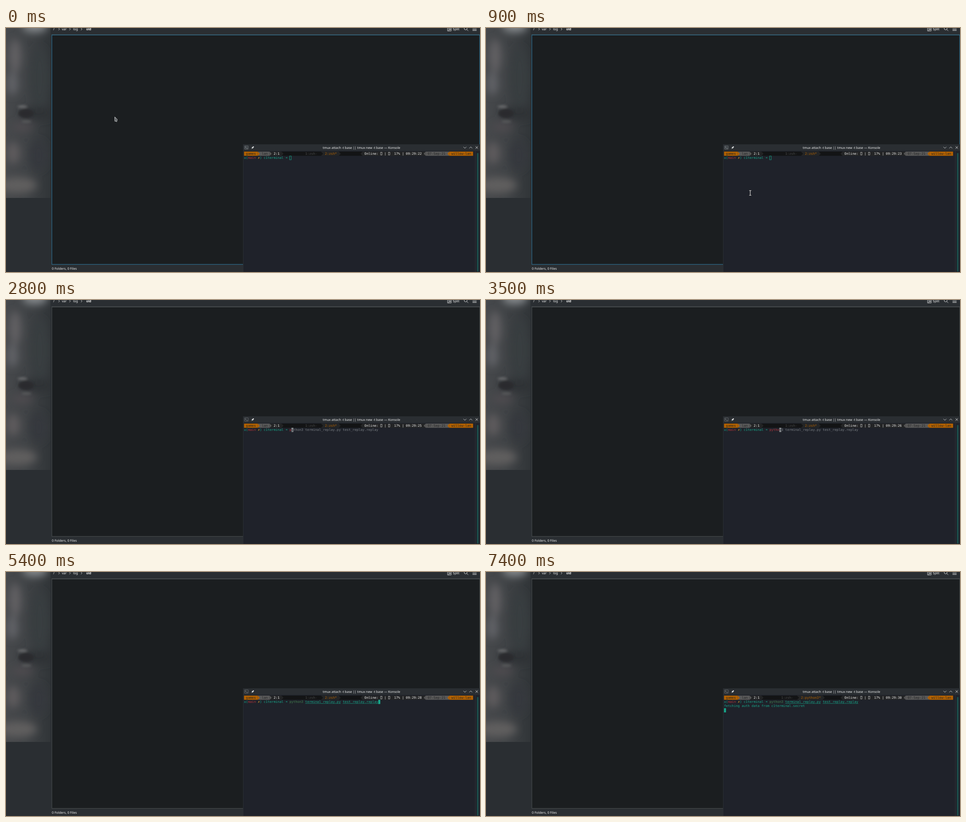
An HTML page that plays this animation: 1044x537 px, repeating every 8000 ms.

```html
<!DOCTYPE html>
<html lang="en">
<head>
<meta charset="utf-8">
<title>Terminal session</title>
<style>
html, body { margin: 0; width: 100%; height: 100%; overflow: hidden; background: #2a2e32; }
svg { display: block; }
text { white-space: pre; text-rendering: geometricPrecision; }
.ui { font: 7.1px "Noto Sans", sans-serif; fill: #f2f3f3; }
.mono { font: 7.226px "DejaVu Sans Mono", monospace; }
.line { fill: none; stroke: #f2f3f3; stroke-width: .8; }
</style>
</head>
<body>
<svg width="1044" height="537" viewBox="0 0 1044 537">
  <defs>
    <clipPath id="wall"><rect width="98" height="374"/></clipPath>
    <filter id="soft" x="-100%" y="-100%" width="300%" height="300%"><feGaussianBlur stdDeviation="9"/></filter>
    <filter id="crisp" x="-100%" y="-100%" width="300%" height="300%"><feGaussianBlur stdDeviation="2.5"/></filter>
    <linearGradient id="shade">
      <stop stop-color="#46484b"/><stop offset=".45" stop-color="#404346"/><stop offset="1" stop-color="#313538"/>
    </linearGradient>
  </defs>

  <!-- wallpaper -->
  <rect width="1044" height="537" fill="#2a2e32"/>
  <g clip-path="url(#wall)">
    <rect width="98" height="374" fill="url(#shade)"/>
    <g filter="url(#soft)">
      <ellipse cx="64" cy="-4" rx="28" ry="14" fill="#85898c"/>
      <ellipse cx="20" cy="62" rx="13" ry="38" fill="#626163"/>
      <ellipse cx="14" cy="122" rx="13" ry="26" fill="#606266"/>
      <ellipse cx="74" cy="110" rx="20" ry="70" fill="#393d40"/>
      <ellipse cx="70" cy="188" rx="38" ry="14" fill="#2e3134"/>
      <ellipse cx="36" cy="218" rx="24" ry="9" fill="#504c4f"/>
      <ellipse cx="16" cy="275" rx="14" ry="24" fill="#5f5c5d"/>
      <ellipse cx="72" cy="280" rx="20" ry="34" fill="#36393c"/>
      <ellipse cx="26" cy="346" rx="42" ry="17" fill="#615e5e"/>
    </g>
    <g filter="url(#crisp)">
      <ellipse cx="36" cy="173" rx="11" ry="3" fill="#68696b"/>
      <ellipse cx="45" cy="206" rx="11" ry="2.5" fill="#595a5c"/>
      <ellipse cx="44" cy="188" rx="17" ry="10" fill="#292b2d"/>
    </g>
  </g>

  <!-- file manager -->
  <rect x="98" width="946" height="537" fill="#2a2e32"/>
  <path d="M100 14.3H1044" stroke="#4b4f52" stroke-width=".7"/>
  <rect id="view" x="101" y="15.4" width="942.3" height="504.8" fill="#1b1e20"/>
  <g class="ui">
    <text x="104" y="5">/</text>
    <text x="123" y="5">var</text>
    <text x="148" y="5">log</text>
    <text x="176.8" y="5" font-weight="700">old</text>
    <text x="984" y="5">Split</text>
    <text x="101" y="532.3">0 Folders, 0 Files</text>
  </g>
  <path class="line" d="M115.5 0l2.5 2.5-2.5 2.5M139.5 0l2.5 2.5-2.5 2.5M165 0l2.5 2.5-2.5 2.5
    M972.5-2V6.5H980.5V-2M975.5-2V6.5M978 .8V4.8M976.4 2.8H979.8M1014.8 3.2L1018 6.4"/>
  <circle class="line" cx="1012.4" cy="1" r="3.2"/>
  <path class="line" d="M1027.5-.5h9M1027.5 2.5h9M1027.5 5.5h9" style="stroke-width:1.2"/>

  <!-- terminal window -->
  <rect x="522" y="256" width="522" height="281" fill="#2a2e32"/>
  <rect x="523" y="270.5" width="521" height="267" fill="#1f222a"/>
  <path d="M1033.6 271V537" stroke="#34383d" stroke-width=".8"/>
  <rect x="1037.2" y="275" width="3.6" height="261" rx="1.6" fill="#1b4f4c"/>
  <rect id="icon" x="525.5" y="259.3" width="8" height="7.6" rx=".8" stroke="#74797d" stroke-width=".7"/>
  <path d="M527 261l1.8 1.5-1.8 1.5M529.5 264.8h2.5" fill="none" stroke="#b4b8ba" stroke-width=".7"/>
  <path d="M540.3 266l2-2-1.2-1.2 2.2-.6 1.3-2 1.7 1.7-2 1.3-.6 2.2-1.1-1.1z" fill="#f2f3f3" stroke="#f2f3f3" stroke-width=".3"/>
  <text class="ui" x="783" y="265.7" text-anchor="middle">tmux attach -t base || tmux new -t base — Konsole</text>
  <path class="line" d="M1007.5 261.6l3.2 3.2 3.2-3.2M1020.5 264.8l3.2-3.2 3.2 3.2M1034.2 260.5l5.2 5.2M1039.4 260.5l-5.2 5.2"/>
  <g id="screen" class="mono"></g>

  <!-- pointers -->
  <path id="arrow" d="M.6 .8L6 6.2 4.7 11.4 3.2 10 .9 10.2z" fill="#55595c" stroke="#e4e5e5" stroke-width=".9" stroke-linejoin="round"/>
  <g id="beam" fill="none">
    <path d="M-2.6-5.4H2.6M0-5.4V5.4M-2.6 5.4H2.6" stroke="#15171a" stroke-width="2.4"/>
    <path d="M-2.4-5.2H2.4M0-5.2V5.2M-2.4 5.2H2.4" stroke="#f0f0f0" stroke-width="1.1"/>
  </g>
</svg>
<script>
const $ = id => document.getElementById(id);
const CELL = 4.35, ROW = 9.25, LEFT = 524.2, TOP = 272;
const ORANGE = '#b06000', GREY = '#585858', DARK = '#242526', BLACK = '#131415',
      TEAL = '#17a88b', RED = '#b3343d', GREEN = '#43804f', DIM = '#7b8085', WHITE = '#eeeeee';
const LOOP = 8000;
const COMMAND = 'python3', ARGS = ['terminal_replay.py', 'test_replay.replay'];
const LINE = [COMMAND, ...ARGS].join(' ');
const PROMPT = 23;

// [time, value] steps
const TICKS = [500, 1500, 2500, 3500, 4500, 5400, 6500, 7400];
const TYPED = [[0, 0], [2800, 1], [3100, 3], [3300, 4], [3500, 5], [3700, 6], [3800, 7], [4900, LINE.length]];
const POINTER = [[0, 239, 195], [200, 270, 213], [300, 388, 279], [400, 487, 332], [500, 524, 351],
                 [800, 533, 355], [900, 582, 363], [1000, 640, 368], [1100, 661, 369]];
const at = (steps, t) => steps.filter(s => s[0] <= t).pop();

const X = col => LEFT + col * CELL;
const Y = row => TOP + row * ROW;
const put = (col, row, text, fill, extra = '') =>
  `<text x="${X(col)}" y="${Y(row) + 6.8}" fill="${fill}" ${extra}>${text}</text>`;
const block = (col, row, cols, fill) =>
  `<rect x="${X(col)}" y="${Y(row)}" width="${cols * CELL}" height="${ROW}" fill="${fill}"/>`;
const hollow = (col, row) =>
  `<rect x="${X(col) + .4}" y="${Y(row) + .5}" width="${CELL - .8}" height="${ROW - 1}" fill="none" stroke="${TEAL}" stroke-width=".8"/>`;
const missing = col =>
  `<rect x="${X(col) + .8}" y="${TOP + 1.5}" width="3" height="5.8" fill="none" stroke="${WHITE}" stroke-width=".6"/>`;
// Powerline separator; dir 1 points right, -1 points left
const wedge = (col, dir, fill) =>
  `<path d="M${X(dir > 0 ? col : col + 1)} ${TOP}l${dir * CELL} ${ROW / 2}l${-dir * CELL} ${ROW / 2}z" fill="${fill}"/>`;

function statusBar(t) {
  const seconds = 22 + TICKS.filter(s => s <= t).length;
  const tab = t < 7400 ? '2:zsh*' : '2:python3*';
  const start = t < 7400 ? 41 : 39, end = start + tab.length + 1;
  return block(0, 0, 7, ORANGE) + block(7, 0, 6, GREY) + wedge(7, 1, ORANGE)
    + block(13, 0, 6, DARK) + wedge(13, 1, GREY)
    + block(19, 0, 41, BLACK) + wedge(19, 1, DARK)
    + block(start - 2, 0, end - start + 2, DARK) + wedge(start - 2, 1, BLACK) + wedge(end, 1, DARK)
    + block(60, 0, 32, DARK) + wedge(59, -1, DARK)
    + block(92, 0, 12, GREY) + wedge(91, -1, GREY)
    + block(104, 0, 12, ORANGE) + wedge(103, -1, ORANGE)
    + put(1, 0, 'games', DARK) + put(9, 0, 'lan', DARK) + put(15, 0, '2:1', WHITE)
    + put(start - 10, 0, '1:zsh-', '#4a4b4c') + put(start, 0, tab, ORANGE)
    + put(61, 0, 'Online:', WHITE) + missing(69) + put(71, 0, '|', WHITE) + missing(73)
    + put(76, 0, `17% | 09:29:${seconds}`, WHITE)
    + put(93, 0, '07-Sep-21', DARK) + put(105, 0, 'willow-lan', DARK);
}

function commandLine(t) {
  const n = at(TYPED, t)[1], cursor = PROMPT + n;
  let out = put(0, 1, '±(', TEAL) + put(2, 1, 'main', RED) + put(7, 1, '✗', '#e0a52e')
    + put(8, 1, ')', TEAL) + put(10, 1, 'c1terminal', TEAL) + put(21, 1, '➜', TEAL);
  if (!n) return out + (t < 1500 ? hollow(PROMPT, 1) : block(PROMPT, 1, 1, TEAL));

  out += put(PROMPT, 1, COMMAND.slice(0, n), n < 6 ? RED : GREEN);
  if (n < LINE.length) {
    return out + put(cursor, 1, LINE.slice(n), DIM)
      + block(cursor, 1, 1, '#8b8e92') + put(cursor, 1, LINE[n], '#1f222a');
  }
  for (const arg of ARGS) {
    const col = PROMPT + LINE.indexOf(arg);
    out += put(col, 1, arg, TEAL)
      + `<path d="M${X(col)} ${Y(1) + 8.2}h${arg.length * CELL}" stroke="${TEAL}" stroke-width=".6"/>`;
  }
  if (t < 6500) return out + block(cursor, 1, 1, TEAL);
  if (t < 6800) return out + block(0, 2, 1, TEAL);
  return out + put(0, 2, 'fetching auth data from c1terminal.secret', TEAL) + block(0, 3, 1, TEAL);
}

let shown = '';
function draw(t) {
  const screen = statusBar(t) + commandLine(t);
  if (screen !== shown) $('screen').innerHTML = shown = screen;

  const focused = t < 1100;
  $('view').setAttribute('stroke', focused ? '#2f7da3' : '#565a5c');
  $('view').setAttribute('stroke-width', focused ? 1 : .8);
  $('icon').setAttribute('fill', t < 1500 ? '#3b4044' : '#2b2f33');

  const [, x, y] = at(POINTER, t);
  for (const id of ['arrow', 'beam']) $(id).setAttribute('transform', `translate(${x} ${y})`);
  $('arrow').style.display = t < 900 ? '' : 'none';
  $('beam').style.display = t >= 900 && t < 2800 ? '' : 'none';
}

const began = performance.now();
function frame() {
  draw((performance.now() - began) % LOOP);
  requestAnimationFrame(frame);
}
frame();
</script>
</body>
</html>
```
